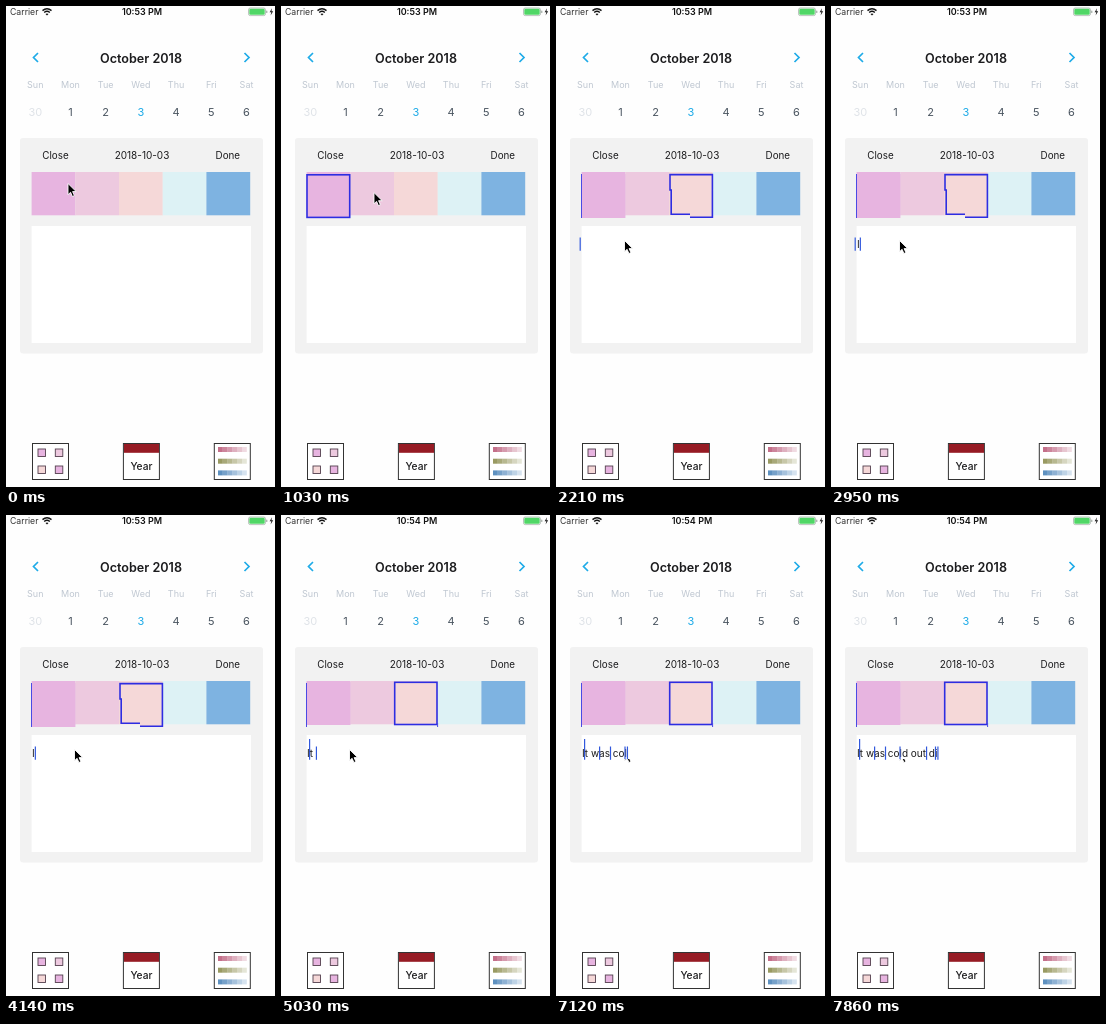
Animation of 269x481 px, one loop 8000 ms. Source, as an HTML page:

```html
<!DOCTYPE html>
<html lang="en">
<head>
<meta charset="utf-8">
<title>Diary calendar</title>
<style>
  html, body { margin: 0; width: 100%; height: 100%; overflow: hidden; background: #fefefe; }
  svg { display: block; width: 100%; height: 100%; font-family: Inter, Roboto, sans-serif; }
</style>
</head>
<body>
<svg id="stage" viewBox="0 0 269 481"></svg>
<script>
const NS = 'http://www.w3.org/2000/svg';
const stage = document.getElementById('stage');
const LOOP = 8000, STEPS = 54, LEAD = 14;
const BLUE = '#2d2de2', INK = '#1c1c1e', SKY = '#1eabe8';

function add(tag, attrs, parent = stage) {
  const el = document.createElementNS(NS, tag);
  for (const k in attrs) el.setAttribute(k, attrs[k]);
  parent.appendChild(el);
  return el;
}
const rect = (x, y, width, height, fill, more) => add('rect', { x, y, width, height, fill, ...more });
const path = (d, more) => add('path', { d, fill: 'none', ...more });
function text(str, x, y, size, fill = INK, anchor = 'middle', weight = 400) {
  const el = add('text', { x, y, fill, 'font-size': size, 'text-anchor': anchor, 'font-weight': weight });
  el.textContent = str;
  return el;
}

rect(0, 0, 269, 481, '#fefefe');

// Status bar
text('Carrier', 4, 9, 8.7, '#333', 'start');
path('M36.5 4.6Q41 .8 45.5 4.6M38.2 6.5Q41 4.1 43.8 6.5', { stroke: '#111', 'stroke-width': 1.4 });
path('M39.5 8L41 9.6L42.5 8Q41 6.8 39.5 8Z', { fill: '#111' });
const clock = text('', 136, 9, 9, '#111', 'middle', 600);
rect(242.5, 2, 17, 7.6, '#fff', { rx: 1.8, stroke: '#8c9a90', 'stroke-width': .6 });
rect(243.3, 2.8, 15.4, 6, '#50d766', { rx: 1.2 });
rect(260.3, 4.5, 1, 2.6, '#8c9a90', { rx: .5 });
path('M266 2.3L263.6 6.3H265.3L264.6 9.5L267.2 5.2H265.5Z', { fill: '#222' });

// Month and week
path('M32 47L27.5 51.5L32 56M238.5 47L243 51.5L238.5 56', { stroke: SKY, 'stroke-width': 1.7 });
text('October 2018', 135, 56.5, 12.6, INK, 'middle', 600);
['Sun', 'Mon', 'Tue', 'Wed', 'Thu', 'Fri', 'Sat'].forEach((day, i) => {
  const x = 29.3 + i * 35.2;
  text(day, x, 82.2, 9, '#bfc7d1');
  text(i || 30, x, 110.3, 11, i === 0 ? '#dfe3e8' : i === 3 ? SKY : '#4a5560');
});

// Entry panel
rect(14, 132, 243, 215.5, '#f2f2f2', { rx: 3 });
text('Close', 49.5, 152.5, 9.8);
text('2018-10-03', 136, 152.5, 10);
text('Done', 221.8, 152.5, 9.8);
const tints = ['#e7b4e0', '#edc9df', '#f5d8d8', '#ddf2f5', '#7eb3e1'];
tints.forEach((tint, i) => rect(25.6 + i * 43.7, 166, 43.8, 43.3, tint));
rect(25.6, 220, 219.4, 117, '#fff');

// Toolbar icons
for (let i = 0; i < 3; i++)
  rect(26.5 + i * 90.9, 437.5, 36, 36, '#fff', { stroke: '#333', 'stroke-width': 1 });
for (let i = 0; i < 4; i++)
  rect(32 + i % 2 * 17.3, 443 + (i >> 1) * 17, 7.5, 7.5, tints[[0, 1, 2, 0][i]], { stroke: '#54404f', 'stroke-width': .9 });
rect(118, 438, 35, 8.8, '#961b24');
text('Year', 135.4, 463.5, 10.2, INK, 'middle', 500);
['#c4708a', '#999a62', '#5e91c0'].forEach((tint, row) => {
  for (let i = 0; i < 6; i++)
    rect(212 + i * 4.8, 441 + row * 11.7, 4.8, 5, tint, { opacity: 1 - i * .15 });
});

// Parts shown only between two steps
const timed = [];
const during = (from, to, ...els) => els.forEach(el => timed.push({ from, to, el }));
const caret = (x, top = 231.5) => path(`M${x} ${top}V244.8`, { stroke: '#3158dc', 'stroke-width': 1.2 });

const outline = { stroke: BLUE, 'stroke-width': 1.6 };
const thin = { stroke: '#4a4ae4', 'stroke-width': 1 };
during(4, 11, rect(26, 168.8, 42.7, 42.6, tints[0], outline));
during(11, 29,
  rect(25.6, 168, 43.8, 44, tints[0]),
  path('M134 208.2H115.2V184H114V168.6H156.4V211.2H134', { ...outline, fill: tints[2] }));
during(29, STEPS,
  rect(25.6, 167, 43.8, 43, tints[0]),
  rect(113.7, 167.3, 42.3, 42.2, tints[2], outline),
  path('M156.6 208V212', thin),
  caret(28.6, 224));
during(11, STEPS, path('M25.5 168V212', thin));
during(15, 26, caret(24.2));
during(38, 46, caret(62));
during(42, 43, caret(75));

// Typing: a bar marks where a caret stays behind
const script = 'It w|as| co|ld out| d|i|';
const words = script.replaceAll('|', '');
const line = text(words, 26, 242, 10, INK, 'start');
const carets = [...words].map((_, i) => caret(line.getEndPositionOfChar(i).x + .5));
const kept = new Set(script.split('|').map((part, i, all) => all.slice(0, i + 1).join('').length));

// First step, last step, letters at each
const bursts = [[19, 20, 1, 1], [32, 38, 2, 7], [46, 53, 8, 18]];
function typed(step) {
  const burst = bursts.filter(b => b[0] <= step).pop();
  if (!burst) return 0;
  const [from, to, first, last] = burst;
  return Math.floor(first + (last - first) * Math.min(1, (step - from) / (to - from)));
}

// Pointer, later hidden behind the typed line
const clip = add('clipPath', { id: 'below' });
add('rect', { x: 0, y: 244, width: 269, height: 20 }, clip);
const holder = add('g', {});
const pointer = add('path', {
  d: 'M0 0V11.2L2.6 8.8L4.4 13L6.4 12.1L4.6 8.1H8.2Z',
  fill: '#000', stroke: '#fff', 'stroke-width': .9
}, holder);

// First step, last step, end point
const legs = [[0, 2, 53, 186], [5, 9, 122, 187], [11, 14, 68.5, 234.5]];
function pointerAt(step) {
  let x = 62, y = 177.5;
  for (const [from, to, endX, endY] of legs) {
    const p = Math.min(1, Math.max(0, (step - from) / (to - from)));
    const ease = 1 - (1 - p) ** 1.25;
    x += (endX - x) * ease;
    y += (endY - y) * ease;
  }
  return `translate(${x} ${y})`;
}

const show = (el, on) => el.setAttribute('visibility', on ? 'visible' : 'hidden');

function draw(t) {
  const step = Math.min(STEPS - 1, Math.floor((t + LEAD) * STEPS / LOOP));
  const count = typed(step);
  clock.textContent = step < 29 ? '10:53 PM' : '10:54 PM';
  timed.forEach(({ from, to, el }) => show(el, step >= from && step < to));
  line.textContent = words.slice(0, count);
  carets.forEach((el, i) => show(el, i + 1 === count || i + 1 < count && kept.has(i + 1)));
  pointer.setAttribute('transform', pointerAt(step));
  holder.setAttribute('clip-path', step >= 48 ? 'url(#below)' : 'none');
}

const start = performance.now();
function tick() {
  draw((performance.now() - start) % LOOP);
  requestAnimationFrame(tick);
}
tick();
</script>
</body>
</html>
```
